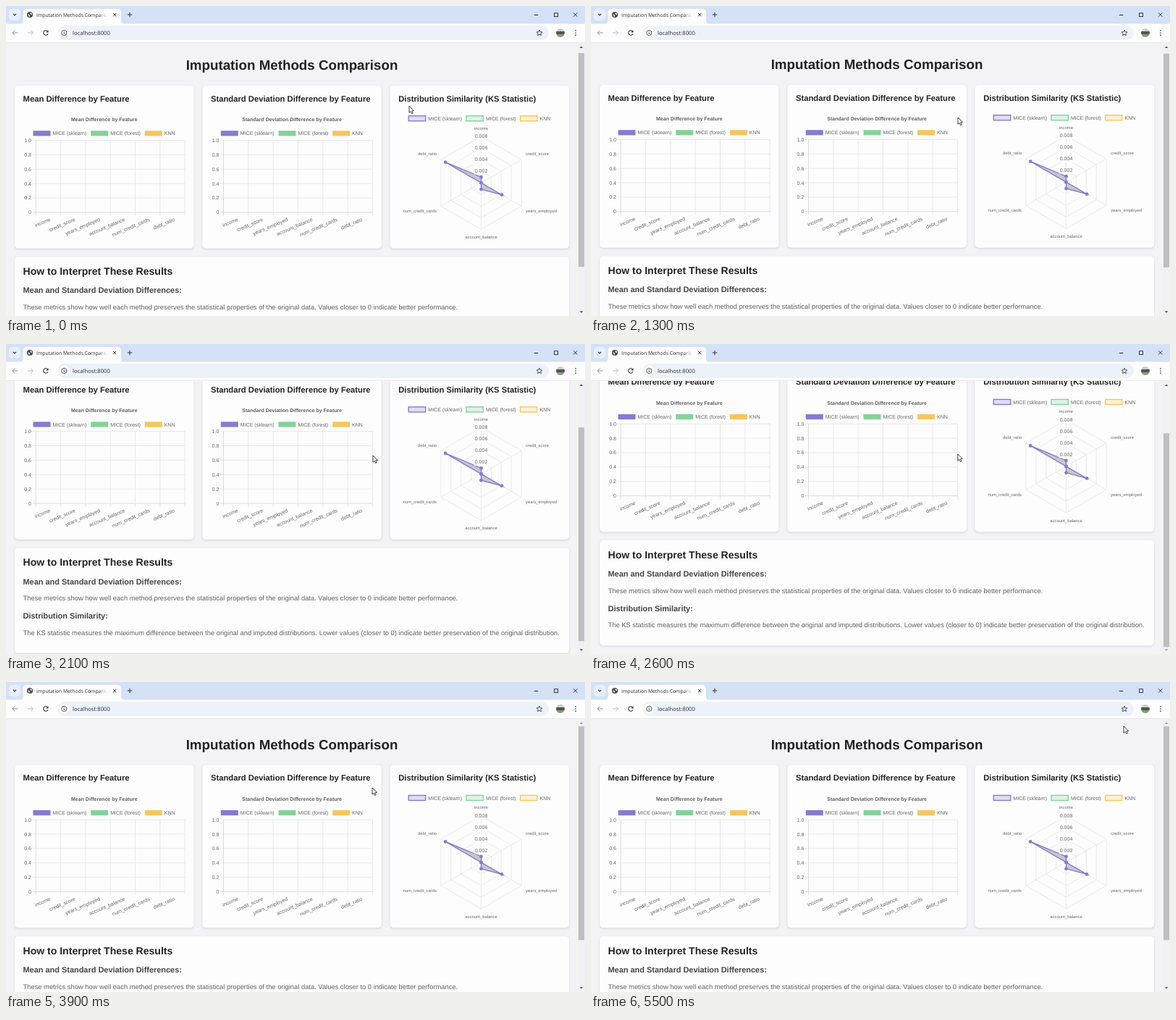
An HTML page with a canvas for the animation above (5600 ms loop, 800 by 428 pixels).

```html
<!DOCTYPE html>
<html lang="en">
<head>
<meta charset="utf-8">
<title>Imputation Methods Comparison</title>
<style>
html, body { margin: 0; width: 100%; height: 100%; overflow: hidden; background: #f3f2f4; }
canvas { display: block; width: 800px; height: 428px; }
</style>
</head>
<body>
<canvas id="stage"></canvas>
<script>
const W = 800, H = 428, LOOP = 5600, STEP = 100, TOP = 51;
const canvas = document.getElementById('stage');
const dpr = window.devicePixelRatio || 1;
canvas.width = W * dpr;
canvas.height = H * dpr;
const ctx = canvas.getContext('2d');
ctx.scale(dpr, dpr);
ctx.textRendering = 'geometricPrecision';

const SANS = '"Liberation Sans", Arial, sans-serif';
const UI = '"Open Sans", "Noto Sans", sans-serif';
const SMALL = 7.03;
const PURPLE = '#857bd2', GREEN = '#84d29a', YELLOW = '#f7c65c';
const PAPER = '#fefdfe', GRID = '#e3e2e4';
const FEATURES = ['income', 'credit_score', 'years_employed',
  'account_balance', 'num_credit_cards', 'debt_ratio'];
const KS = [0.001, 0, 0.0041, 0.0011, 0, 0.0071];
const LEGEND = [['MICE (sklearn)', PURPLE, 0], ['MICE (forest)', GREEN, 79.7], ['KNN', YELLOW, 154.3]];

// [time, value...] keys
const SCROLL = [[1200, 4.8], [1300, 5.8], [1500, 11.5], [1700, 22.7], [1900, 46.5],
  [2100, 69.6], [2300, 77.5], [2600, 80], [3200, 80], [3350, 66], [3500, 40], [3650, 12], [3800, 0]];
const POINTER = [[0, 557, 138], [150, 554, 139], [500, 512, 152], [700, 507, 154], [2500, 507, 154],
  [2900, 506, 146], [4500, 506, 146], [4700, 530, 137], [5200, 705, 72], [5400, 736, 61]];

function track(keys, t, i = 1) {
  if (t <= keys[0][0]) return keys[0][i];
  for (let k = 1; k < keys.length; k++) {
    const a = keys[k - 1], b = keys[k];
    if (t <= b[0]) return a[i] + (b[i] - a[i]) * (t - a[0]) / (b[0] - a[0]);
  }
  return keys[keys.length - 1][i];
}

// y is the middle of the capital letters
function text(str, x, y, size, color = '#666', { weight = 400, align = 'left', font = SANS } = {}) {
  ctx.font = `${weight} ${size}px ${font}`;
  ctx.textAlign = align;
  ctx.fillStyle = color;
  ctx.fillText(str, x, y + size * 0.358);
}

function rect(x, y, w, h, color) {
  ctx.fillStyle = color;
  ctx.fillRect(x, y, w, h);
}

function round(x, y, w, h, r, color) {
  ctx.beginPath();
  ctx.roundRect(x, y, w, h, r);
  ctx.fillStyle = color;
  ctx.fill();
}

function path(points, { fill, stroke, width = 1, close = false } = {}) {
  ctx.beginPath();
  points.forEach(([x, y], i) => i ? ctx.lineTo(x, y) : ctx.moveTo(x, y));
  if (close) ctx.closePath();
  if (fill) { ctx.fillStyle = fill; ctx.fill(); }
  if (stroke) { ctx.strokeStyle = stroke; ctx.lineWidth = width; ctx.stroke(); }
}

const line = (x1, y1, x2, y2, stroke, width = 1) => path([[x1, y1], [x2, y2]], { stroke, width });

function disc(x, y, r, color) {
  ctx.beginPath();
  ctx.arc(x, y, r, 0, 7);
  ctx.fillStyle = color;
  ctx.fill();
}

function arc(x, y, r, from, to, color, width) {
  ctx.beginPath();
  ctx.arc(x, y, r, from, to);
  ctx.strokeStyle = color;
  ctx.lineWidth = width;
  ctx.stroke();
}

function card(x, y, w, h) {
  ctx.save();
  ctx.shadowColor = 'rgba(0,0,0,.13)';
  ctx.shadowBlur = 2.6 * dpr;
  ctx.shadowOffsetY = 1.1 * dpr;
  round(x, y, w, h, 4.7, PAPER);
  ctx.restore();
}

function legend(x, y, outlined) {
  for (const [name, color, dx] of LEGEND) {
    if (outlined) {
      ctx.globalAlpha = 0.25;
      rect(x + dx, y - 3.5, 23.4, 7, color);
      ctx.globalAlpha = 1;
      ctx.strokeStyle = color;
      ctx.lineWidth = 1.4;
      ctx.strokeRect(x + dx, y - 3.5, 23.4, 7);
    } else {
      rect(x + dx, y - 3.6, 24, 7.2, color);
    }
    text(name, x + dx + 27, y, SMALL);
  }
}

function barChart(x, title) {
  const left = x + 29.2, right = x + 235.2, top = 190.2, bottom = 289.6;
  const gap = (right - left) / 6;
  text(title, x + 123.8, 161, SMALL, '#5f5f5f', { weight: 700, align: 'center' });
  legend(x + 25.5, 180.6, false);
  ['1.0', '0.8', '0.6', '0.4', '0.2', '0'].forEach((label, i) => {
    const y = top + (bottom - top) * i / 5;
    line(left - 4.7, y, right, y, i === 5 ? '#d2d1d3' : GRID, 0.8);
    text(label, left - 6.2, y, SMALL, '#666', { align: 'right' });
  });
  for (let i = 0; i <= 6; i++) {
    line(left + gap * i, top, left + gap * i, bottom + 4.7, i ? GRID : '#d2d1d3', 0.8);
  }
  FEATURES.forEach((name, i) => {
    ctx.save();
    ctx.translate(left + gap * (i + 0.5) + 2.5, 299);
    ctx.rotate(-23 * Math.PI / 180);
    text(name, 0, 0, SMALL, '#666', { align: 'right' });
    ctx.restore();
  });
}

function radarChart() {
  const cx = 656.5, cy = 249, R = 64.2;
  const spoke = (i, r) => {
    const a = i * Math.PI / 3;
    return [cx + r * Math.sin(a), cy - r * Math.cos(a)];
  };
  legend(556.3, 160, true);
  for (let ring = 1; ring <= 4; ring++) {
    path(FEATURES.map((_, i) => spoke(i, R * ring / 4)), { stroke: GRID, width: 0.7, close: true });
  }
  FEATURES.forEach((_, i) => line(cx, cy, ...spoke(i, R), GRID, 0.7));

  const dots = KS.map((v, i) => spoke(i, R * v / 0.008));
  path(dots, { fill: '#c8c7ca', stroke: PURPLE, width: 1.4, close: true });
  dots.forEach(([x, y]) => disc(x, y, 2.4, PURPLE));

  for (let ring = 1; ring <= 4; ring++) {
    const y = cy - R * ring / 4;
    rect(cx - 10, y - 4.6, 20, 9.2, 'rgba(255,255,255,.75)');
    text((ring * 0.002).toFixed(3), cx, y - 0.4, SMALL, '#666', { align: 'center' });
  }
  const aligns = ['center', 'left', 'left', 'center', 'right', 'right'];
  const dx = { center: 0, left: 61.5, right: -61.5 };
  const dy = [-75.6, -39.8, 38.9, 74.8, 38.9, -39.8];
  FEATURES.forEach((name, i) =>
    text(name, cx + dx[aligns[i]], cy + dy[i], 5.86, '#666', { align: aligns[i] }));
}

function page(scroll) {
  const bold = { weight: 700 };
  ctx.save();
  ctx.beginPath();
  ctx.rect(0, TOP, 790, H - TOP);
  ctx.clip();
  ctx.translate(0, -scroll);
  text('Imputation Methods Comparison', 395, 86, 18.75, '#222', { weight: 700, align: 'center' });

  ['Mean Difference by Feature', 'Standard Deviation Difference by Feature',
    'Distribution Similarity (KS Statistic)'].forEach((title, i) => {
    const x = 12 + 259.3 * i;
    card(x, 114.8, 247.5, 224.7);
    text(title, x + 11.6, 132.4, 11.25, '#222', bold);
    if (i < 2) barChart(x, title);
  });
  radarChart();

  card(12, 351, 766, 145.4);
  text('How to Interpret These Results', 23.5, 371, 14.06, '#222', bold);
  text('Mean and Standard Deviation Differences:', 23.5, 397.3, 10.94, '#444', bold);
  text('These metrics show how well each method preserves the statistical properties of the original data. ' +
    'Values closer to 0 indicate better performance.', 23.5, 420.2, 9.365, '#626262');
  text('Distribution Similarity:', 23.5, 444.8, 10.94, '#444', bold);
  text('The KS statistic measures the maximum difference between the original and imputed distributions. ' +
    'Lower values (closer to 0) indicate better preservation of the original distribution.',
    23.5, 467.8, 9.365, '#626262');
  ctx.restore();
}

function scrollbar(scroll) {
  rect(790, TOP, 10, H - TOP, '#f1f0f2');
  rect(791, 61.3 + scroll * 0.775, 8, 295, '#bfbec0');
  const tip = (y, d, on) => path([[792.6, y + 1.3 * d], [795, y - 1.3 * d], [797.4, y + 1.3 * d]],
    { fill: on ? '#555' : '#a6a6a6', close: true });
  tip(56.7, 1, scroll > 0.5);
  tip(422.5, -1, scroll < 79.5);
}

function tabStrip() {
  rect(0, 0, W, 25, '#d4e1f7');
  round(4, 4, 16, 16, 5, '#e7effc');
  path([[10, 11], [12, 13], [14, 11]], { stroke: '#333', width: 1.1 });

  ctx.beginPath();
  ctx.moveTo(19, 25);
  ctx.quadraticCurveTo(23.5, 25, 23.5, 20);
  ctx.lineTo(23.5, 9);
  ctx.quadraticCurveTo(23.5, 4, 28.5, 4);
  ctx.lineTo(154, 4);
  ctx.quadraticCurveTo(159, 4, 159, 9);
  ctx.lineTo(159, 20);
  ctx.quadraticCurveTo(159, 25, 163.5, 25);
  ctx.fillStyle = PAPER;
  ctx.fill();

  disc(33, 12, 4.1, '#484b50');
  path([[30.2, 11], [32.6, 12.2], [33, 14.6], [31.6, 14.8]], { fill: '#eee' });
  path([[33.2, 9.2], [35.6, 9.8], [36, 12.2], [34, 11.4]], { fill: '#eee' });

  const fade = ctx.createLinearGradient(128, 0, 140, 0);
  fade.addColorStop(0, '#2b2b2b');
  fade.addColorStop(1, 'rgba(43,43,43,0)');
  text('Imputation Methods Comparison', 42, 12.3, 6.8, fade, { font: UI });

  line(148, 10, 152.2, 14.2, '#333', 1);
  line(152.2, 10, 148, 14.2, '#333', 1);
  line(167.8, 12, 174.2, 12, '#333', 1);
  line(171, 8.8, 171, 15.2, '#333', 1);

  line(729.8, 12.5, 735.2, 12.5, '#222', 1);
  ctx.strokeStyle = '#222';
  ctx.lineWidth = 0.9;
  ctx.strokeRect(757.6, 9.8, 4.8, 4.8);
  line(784, 9.3, 789.4, 14.7, '#222', 0.9);
  line(789.4, 9.3, 784, 14.7, '#222', 0.9);
}

function arrow(x, dir, color) {
  line(x - 3.7 * dir, 37, x + 3.5 * dir, 37, color, 1);
  path([[x + 0.4 * dir, 33.6], [x + 3.8 * dir, 37], [x + 0.4 * dir, 40.4]], { stroke: color, width: 1 });
}

function avatar() {
  ctx.save();
  ctx.beginPath();
  ctx.arc(766, 37, 5.9, 0, 7);
  ctx.clip();
  rect(760, 31, 12, 12, '#c9cfd2');
  rect(760, 35, 12, 4, '#4b5a48');
  rect(760, 39, 12, 5, '#8a9a80');
  ctx.restore();
}

function toolbar() {
  rect(0, 24.5, W, 26, PAPER);
  rect(0, 50.2, W, 0.8, '#e6e6ea');
  arrow(12.7, -1, '#8d8d90');
  arrow(33.7, 1, '#b9b9bd');

  arc(55, 37, 3.2, 0.35, 5.5, '#333', 1.1);
  path([[58.5, 33.2], [58.5, 36.4], [55.4, 36.4]], { fill: '#333', close: true });

  round(71.5, 27.2, 678.5, 19.8, 9.9, '#edf1fa');
  disc(80.3, 37, 7.2, PAPER);
  arc(80.3, 37, 3.6, 0, 7, '#444', 0.9);
  rect(79.8, 36.4, 1, 2.6, '#444');
  rect(79.8, 34.8, 1, 1, '#444');
  text('localhost:8000', 92, 37.2, 7.7, '#2f3033', { font: UI });

  const star = Array.from({ length: 10 }, (_, i) => {
    const r = i % 2 ? 1.9 : 4.2, a = i * Math.PI / 5;
    return [737 + r * Math.sin(a), 37.3 - r * Math.cos(a)];
  });
  path(star, { stroke: '#3f4044', width: 0.9, close: true });
  avatar();
  [33.8, 37, 40.2].forEach(y => disc(787, y, 0.85, '#444'));
}

function pointer(x, y) {
  const shape = [[0, 0], [0, 9.3], [2.1, 7.4], [3.6, 10.6], [5.2, 9.9], [3.8, 6.8], [6.5, 6.6]];
  path(shape.map(([dx, dy]) => [x + dx, y + dy]),
    { fill: '#fff', stroke: '#222', width: 0.85, close: true });
}

function draw(now) {
  const t = Math.floor(now % LOOP / STEP) * STEP;
  const scroll = track(SCROLL, t);
  rect(0, 0, W, H, '#f3f2f4');
  page(scroll);
  scrollbar(scroll);
  tabStrip();
  toolbar();
  pointer(track(POINTER, t, 1), track(POINTER, t, 2));
}

const start = performance.now();
function tick() {
  draw(performance.now() - start);
  requestAnimationFrame(tick);
}
tick();
</script>
</body>
</html>
```
